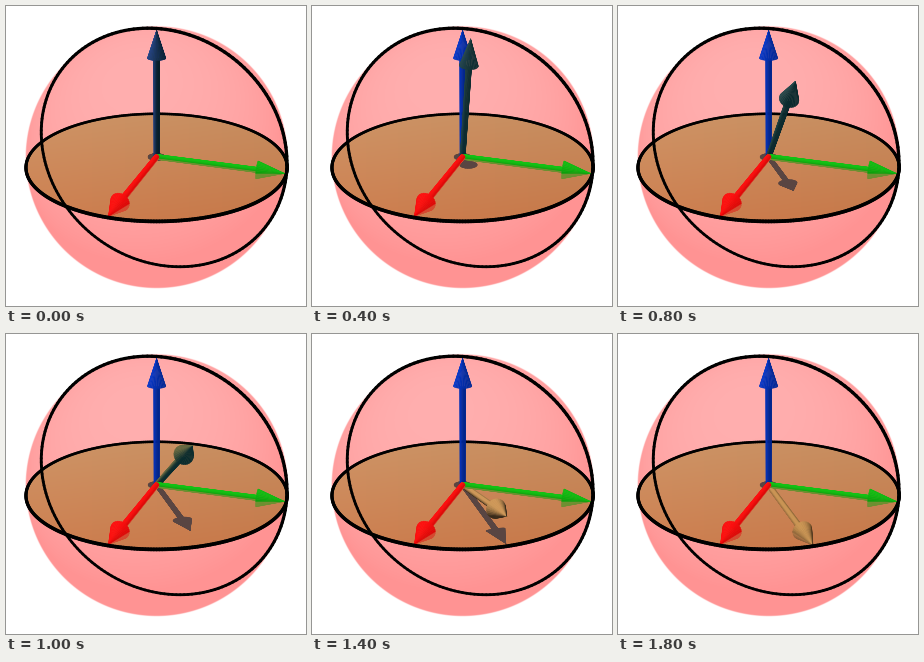
These frames come from a looping animation (300x300 px, 2000 ms). A matplotlib script:

```python
import numpy as np
import matplotlib.pyplot as plt
from matplotlib.animation import FuncAnimation
from matplotlib.collections import LineCollection, PolyCollection
from matplotlib.patches import Polygon

SIZE, FRAMES = 300, 10
CX, CY = 150.6, 150.9
DIST, FOCAL = 4.6, 589
TILT = np.radians(23.8)
C, S = np.cos(TILT), np.sin(TILT)
CAMERA = np.array([0, DIST * C, DIST * S])
LIGHT = np.array([-0.4, 0.85, 0.3])
LIGHT /= np.linalg.norm(LIGHT)
LENGTH, NECK = 0.985, 0.785
SHAFT_R, CONE_R = 0.02, 0.067
SHADOW = (0.35, 0.27, 0.26)
PLATE = np.array([205, 138, 88]) / 255


def to_view(p):
    """World (right, forward, up) to view (right, up, toward the eye)."""
    x, y, z = np.moveaxis(np.asarray(p, float), -1, 0)
    return np.stack([x, z * C - y * S, y * C + z * S], axis=-1)


def project(p):
    v = to_view(p)
    scale = FOCAL / (DIST - v[..., 2])
    return np.stack([CX + v[..., 0] * scale, CY - v[..., 1] * scale], axis=-1)


def heading(azimuth):
    a = np.radians(azimuth)
    return np.array([np.sin(a), np.cos(a), 0])


UP = np.array([0, 0, 1.0])
RED_DIR, GREEN_DIR, MOVE_DIR = heading(-18.1), heading(72.2), heading(16.6)


def arrow_faces(d, n=28):
    """Shaft quads, then cone triangles, each with its outward normal."""
    side = np.cross(d, [1e-6, 0, 1])
    side /= np.linalg.norm(side)
    other = np.cross(d, side)
    angle = np.linspace(0, 2 * np.pi, n + 1)
    rim = np.outer(np.cos(angle), side) + np.outer(np.sin(angle), other)
    slope = CONE_R / (LENGTH - NECK)
    shaft, cone = [], []
    for p, q in zip(rim[:-1], rim[1:]):
        normal = (p + q) / np.linalg.norm(p + q)
        shaft.append((np.array([p * SHAFT_R, q * SHAFT_R,
                                q * SHAFT_R + d * NECK, p * SHAFT_R + d * NECK]), normal))
        leaning = normal + slope * d
        cone.append((np.array([p * CONE_R + d * NECK, q * CONE_R + d * NECK, d * LENGTH]),
                     leaning / np.linalg.norm(leaning)))
    base = (rim[:-1] * CONE_R + d * NECK, -d)
    return shaft + [base] + cone


def paint(d, dark, light):
    verts, colors = [], []
    dark, light = np.array(dark) / 255, np.array(light) / 255
    for pts, normal in arrow_faces(d):
        middle = pts.mean(axis=0)
        if normal @ (CAMERA - middle) <= 0:
            continue
        lit = np.clip(0.2 + 0.9 * (to_view(normal) @ LIGHT), 0, 1)
        color = dark + (light - dark) * lit
        if middle[2] < -1e-4:  # seen through the translucent plate
            color = (color + PLATE) / 2
        verts.append(project(pts))
        colors.append(color)
    return verts, colors


def shadow(d):
    return [project(pts * [1, 1, 0]) for pts, _ in arrow_faces(d)]


# tilt in degrees against dark and light tone of the moving arrow
TONE_AT = [0, 9, 40, 54, 79, 90]
DARK = np.array([(8, 30, 40), (14, 44, 48), (10, 42, 46),
                 (10, 44, 46), (56, 42, 26), (84, 58, 30)])
LIGHTS = np.array([(48, 80, 148), (48, 80, 84), (40, 74, 76),
                   (108, 108, 64), (208, 154, 90), (206, 152, 86)])


def tone(table, deg):
    return [np.interp(deg, TONE_AT, table[:, i]) for i in range(3)]


def circle_lines(u, v, start, end, width):
    a = np.linspace(start, end, 181)
    pts = np.outer(np.cos(a), u) + np.outer(np.sin(a), v)
    xy = project(pts)
    depth = DIST - to_view(pts)[:-1, 2]
    return LineCollection(np.stack([xy[:-1], xy[1:]], axis=1), colors="black",
                          linewidths=width * FOCAL / depth * 0.72, capstyle="round")


def sphere_image(scale=2):
    axis = (np.arange(SIZE * scale) + 0.5) / scale
    x, y = np.meshgrid((axis - CX) / 130.8, (151.2 - axis) / 130.8)
    r = np.hypot(x, y)
    z = np.sqrt(np.clip(1 - r * r, 0, 1))
    lit = np.clip(-0.15 * x + 0.5 * y + 0.7 * z, 0, 1)
    img = np.ones(x.shape + (4,))
    img[..., 1] = img[..., 2] = (147 + 32 * lit) / 255
    img[..., 3] = np.clip((1 - r) * 130.8 + 0.5, 0, 1)
    return img


def disk_image():
    x, y = np.meshgrid(np.linspace(0, 1, 60), np.linspace(0, 1, 60))
    rear, near = np.array([206, 149, 103]), np.array([206, 127, 80])
    img = rear + (near - rear) * y[..., None] - 8 * x[..., None]
    return img / 255


fig = plt.figure(figsize=(3, 3), dpi=100, facecolor="white")
ax = fig.add_axes([0, 0, 1, 1])
ax.axis("off")

ax.imshow(sphere_image(), extent=(0, SIZE, SIZE, 0), zorder=0)
turn = np.linspace(0, 2 * np.pi, 200)
plate = Polygon(project(np.stack([np.cos(turn), np.sin(turn), 0 * turn], axis=-1)),
                facecolor="none", edgecolor="none")
ax.add_patch(plate)
surface = ax.imshow(disk_image(), extent=(19, 283, 216, 107),
                    interpolation="bilinear", zorder=1)
surface.set_clip_path(plate)

RIGHT, FORWARD = np.eye(3)[:2]
back = circle_lines(RIGHT, FORWARD, np.pi, 2 * np.pi, 0.0235)
front = circle_lines(RIGHT, FORWARD, 0, np.pi, 0.0235)
ring = circle_lines(GREEN_DIR, UP, 0, 2 * np.pi, 0.0235)
shade = PolyCollection([], facecolors=[SHADOW], edgecolors=[SHADOW], linewidths=0.2)
arrows = PolyCollection([], linewidths=0.3)
for order, part in enumerate((back, shade, ring, arrows, front), start=2):
    part.set_zorder(order)
    ax.add_collection(part)
ax.set_xlim(0, SIZE)
ax.set_ylim(SIZE, 0)
ax.set_aspect("auto")

BLUE = paint(UP, (0, 36, 140), (10, 62, 216))
GREEN = paint(GREEN_DIR, (10, 150, 10), (18, 196, 20))
RED = paint(RED_DIR, (222, 8, 8), (255, 16, 16))
UP_SHADOW = shadow(UP)


def draw(i):
    t = i / (FRAMES - 1)
    deg = 90 * t * t * (3 - 2 * t)
    a = np.radians(deg)
    d = np.cos(a) * UP + np.sin(a) * MOVE_DIR
    moving = paint(d, tone(DARK, deg), tone(LIGHTS, deg))
    layers = (BLUE, moving, GREEN, RED)
    colors = [c for layer in layers for c in layer[1]]
    arrows.set_verts([v for layer in layers for v in layer[0]])
    arrows.set_facecolor(colors)
    arrows.set_edgecolor(colors)
    shade.set_verts(UP_SHADOW + shadow(d))
    return shade, arrows


anim = FuncAnimation(fig, draw, frames=FRAMES, interval=200, repeat=True, repeat_delay=0)
plt.show()
```
